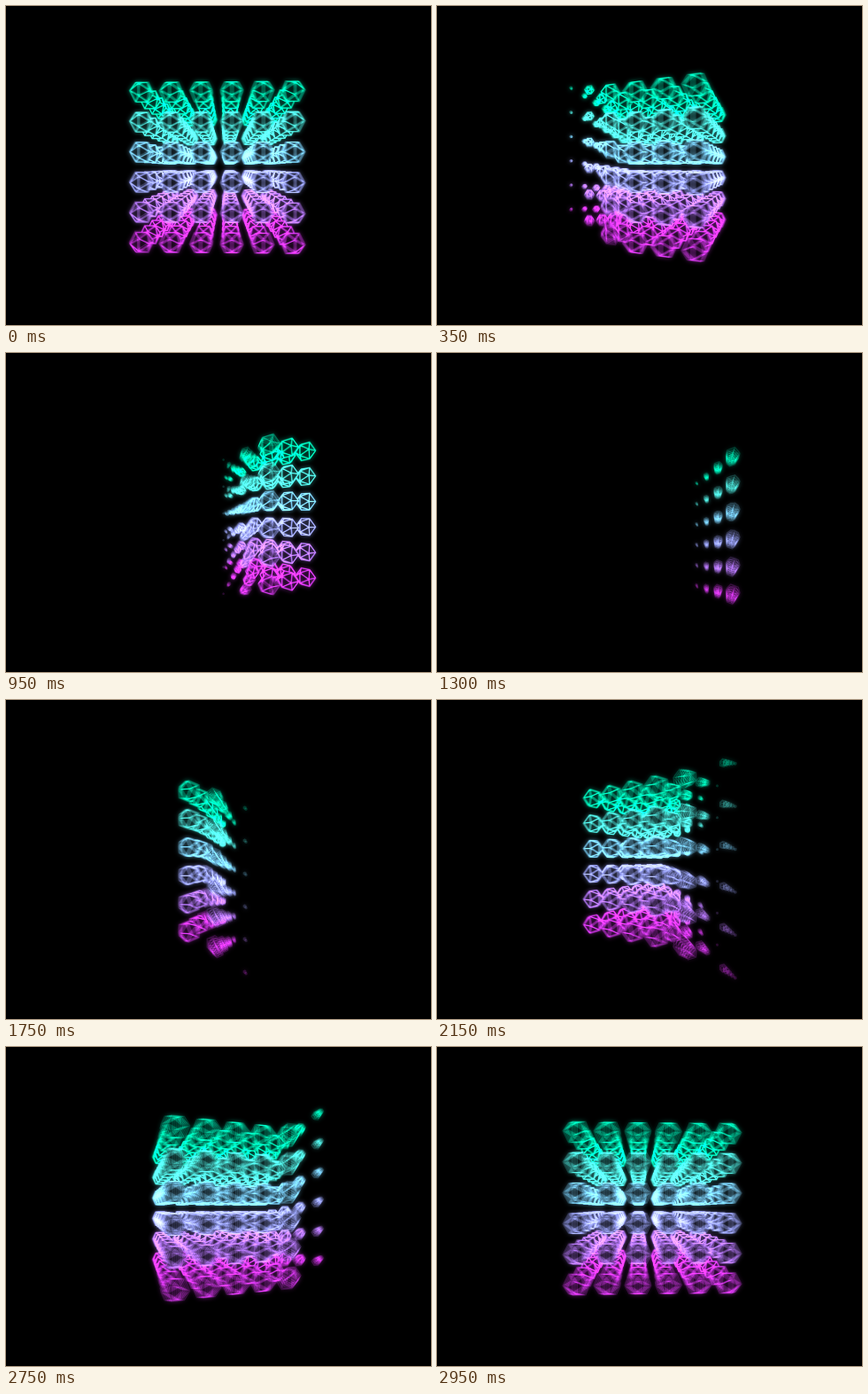
These frames come from a looping animation (480x360 px, 3000 ms). An HTML page with a canvas:

```html
<!DOCTYPE html>
<html lang="en">
<head>
<meta charset="utf-8">
<title>Sphere lattice</title>
<style>
  html, body { margin: 0; width: 100%; height: 100%; overflow: hidden; background: #000; }
  canvas { display: block; width: 480px; height: 360px; }
</style>
</head>
<body>
<canvas id="stage" width="480" height="360"></canvas>
<script>
const W = 480, H = 360, CX = 240, CY = 182;
const LOOP = 3, STEP = 0.05, SAMPLES = 5;
const FOCAL = 300, DIST = 11.3;   // in units of lattice spacing
const RADIUS = 0.385;
const COLORS = ['#00d8a6', '#45d0c8', '#72c2e8', '#949cf0', '#a76ee6', '#c030d6'];
const GRID = [-2.5, -1.5, -0.5, 0.5, 1.5, 2.5];

function context(canvas) {
  canvas.width = W;
  canvas.height = H;
  return canvas.getContext('2d');
}
const out = context(document.getElementById('stage'));
const ctx = context(document.createElement('canvas'));   // one sharp sample
const sum = context(document.createElement('canvas'));   // motion-blurred sum

// Icosahedron with outward-facing triangles
const PHI = (1 + Math.sqrt(5)) / 2;
const verts = [];
for (const a of [-1, 1]) {
  for (const b of [-PHI, PHI]) verts.push([0, a, b], [a, b, 0], [b, 0, a]);
}
const near = (p, q) => Math.hypot(p[0] - q[0], p[1] - q[1], p[2] - q[2]) < 2.1;
const det = (p, q, r) =>
  p[0] * (q[1] * r[2] - q[2] * r[1]) -
  p[1] * (q[0] * r[2] - q[2] * r[0]) +
  p[2] * (q[0] * r[1] - q[1] * r[0]);
const faces = [];
for (let i = 0; i < 12; i++) {
  for (let j = i + 1; j < 12; j++) {
    for (let k = j + 1; k < 12; k++) {
      const [p, q, r] = [verts[i], verts[j], verts[k]];
      if (near(p, q) && near(q, r) && near(p, r)) {
        faces.push(det(p, q, r) > 0 ? [i, j, k] : [i, k, j]);
      }
    }
  }
}
const UNIT = RADIUS / Math.hypot(1, PHI);

// Opaque sphere with its visible edges
function drawSphere({ x, y, z, scale, color }, spin) {
  const pts = spin.map(v => {
    const k = FOCAL / (DIST - z - v[2] * scale);
    return [CX + (x + v[0] * scale) * k, CY + (y + v[1] * scale) * k];
  });
  ctx.beginPath();
  for (const [i, j, k] of faces) {
    const a = pts[i], b = pts[j], c = pts[k];
    if ((b[0] - a[0]) * (c[1] - a[1]) < (b[1] - a[1]) * (c[0] - a[0])) continue;
    ctx.moveTo(a[0], a[1]);
    ctx.lineTo(b[0], b[1]);
    ctx.lineTo(c[0], c[1]);
    ctx.closePath();
  }
  ctx.fill();
  ctx.strokeStyle = color;
  ctx.stroke();
}

// Turn, sideways slide and scale rule: a front sweeps the lattice from left to
// right, first dissolving it, then building it again
function pose(t) {
  if (t < LOOP / 2) {
    const edge = -2.75 + 4.7 * t, width = Math.max(1.2, 2.9 - 1.4 * t);
    return { degrees: 58 * t, slide: 0, depth: x => (edge - x) / width };
  }
  const u = LOOP - t;
  const edge = 3 - 4 * u - 0.5 * u * u;
  return {
    degrees: 16 * u * u - 81 * u,
    slide: 1.2 * u + 0.35 * u * u,
    depth: x => (x - edge) / 1.5
  };
}

function drawLattice(t) {
  const { degrees, slide, depth } = pose(t);
  const angle = degrees * Math.PI / 180;
  const c = Math.cos(angle), s = Math.sin(angle);
  const swing = 2 * Math.PI * t / LOOP;
  const liftY = -1.2 * Math.cos(swing), liftZ = -1.8 * Math.sin(swing);
  const spin = verts.map(([x, y, z]) =>
    [(x * c - z * s) * UNIT, y * UNIT, (z * c + x * s) * UNIT]);

  const spheres = [];
  for (const gx of GRID) {
    for (const gz of GRID) {
      const x = gx * c - gz * s;
      const d = Math.max(0, depth(x));
      if (d >= 1) continue;
      const scale = 0.06 + 0.94 * Math.pow(1 - d, 1.1);
      const z = gz * c + gx * s + liftZ * (1 - scale);
      GRID.forEach((gy, row) => spheres.push({
        x: x + slide, y: gy + liftY * (1 - scale), z, scale, color: COLORS[row]
      }));
    }
  }
  const far = p => Math.hypot(p.x, p.y, DIST - p.z);
  spheres.sort((a, b) => far(b) - far(a));

  ctx.fillStyle = '#000';
  ctx.fillRect(0, 0, W, H);
  ctx.lineWidth = 1.2;
  ctx.lineJoin = 'round';
  for (const p of spheres) drawSphere(p, spin);
}

function render(t) {
  sum.globalCompositeOperation = 'source-over';
  sum.globalAlpha = 1;
  sum.fillStyle = '#000';
  sum.fillRect(0, 0, W, H);
  sum.globalCompositeOperation = 'lighter';
  sum.globalAlpha = 1 / SAMPLES;
  for (let i = 0; i < SAMPLES; i++) {
    drawLattice(t + STEP * (i + 0.5) / SAMPLES);
    sum.drawImage(ctx.canvas, 0, 0);
  }

  out.globalCompositeOperation = 'source-over';
  out.drawImage(sum.canvas, 0, 0);
  out.globalCompositeOperation = 'lighter';
  out.filter = 'blur(2.5px)';
  out.globalAlpha = 0.8;
  out.drawImage(sum.canvas, 0, 0);
  out.filter = 'none';
  out.globalAlpha = 1;
}

const start = performance.now();
const steps = Math.round(LOOP / STEP);
let shown = -1;
function frame() {
  const now = Math.max(0, performance.now() - start);
  const n = Math.floor(now / (STEP * 1000)) % steps;
  if (n !== shown) {
    shown = n;
    render(n * STEP);
  }
  requestAnimationFrame(frame);
}
frame();
</script>
</body>
</html>
```
